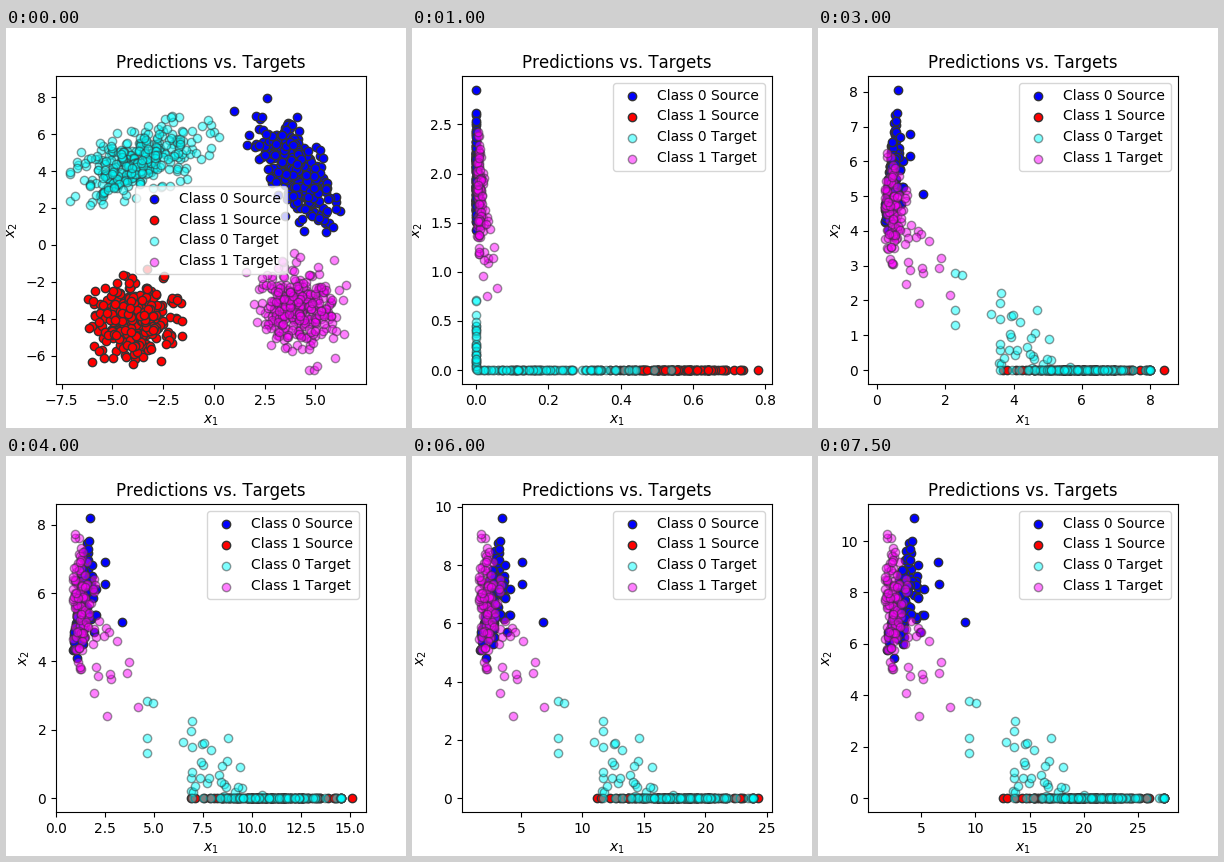
Recreate the animation shown at these times as a matplotlib script. Size 400 by 400 pixels, loop 8 s.

```python
import numpy as np
import matplotlib.pyplot as plt
from matplotlib.animation import FuncAnimation

plt.rcParams["text.kerning_factor"] = 6
rng = np.random.default_rng(7)
N = 120

SERIES = [("Class 0 Source", "blue", 1.0), ("Class 1 Source", "red", 1.0),
          ("Class 0 Target", "cyan", 0.5), ("Class 1 Target", "magenta", 0.5)]

# Snapshots play in file-name order, so epoch 5 comes after 45.
EPOCHS = sorted(range(0, 71, 5), key=str)

# Growth of the feature range during training
KEYS = [0, 5, 10, 15, 30, 40, 50, 55, 70]
X_MIN = [0, 0, 0, .02, .15, .72, 1.1, 1.35, 1.4]
X_MAX = [.45, .0396, .78, 1.8, 8.4, 15.12, 22, 24.27, 27.4]
Y_MAX = [.95, 2.19, 2.85, 3.93, 8.05, 8.2, 10.1, 9.62, 10.9]

X_IN, Y_IN = (-7.09, 6.8), (-6.76, 8.38)


def relu(a):
    return np.maximum(a, 0)


def unit(a):
    return (a - a.min()) / np.ptp(a)


def blob(cx, cy, sx, sy, corr, n=330):
    a, b = rng.normal(size=(2, n))
    x = cx + sx * a
    y = cy + sy * (corr * a + np.sqrt(1 - corr ** 2) * b)
    return np.clip(x, *X_IN), np.clip(y, *Y_IN)


INPUTS = [blob(4.1, 4.1, .95, 1.4, -.62), blob(-4, -4, .95, .95, 0),
          blob(-3.8, 4.5, 1.35, .95, .5), blob(4.1, -3.4, .9, 1.05, 0)]

# Per-sample latents, shared by all epochs
blue_v = .5 + .5 * unit(rng.normal(size=N))
blue_tail = .012 * rng.lognormal(0, .9, N)
red_q = unit(rng.normal(size=N))
cyan_u = np.clip(rng.normal(.64, .16, N + 30), .26, .95)
cyan_d = 1.3 * (.52 - cyan_u) + rng.normal(0, .11, N + 30)
mag_u = np.minimum(.04 * rng.lognormal(0, .75, N), .25)
mag_v = .68 + rng.normal(0, .11, N) - 1.6 * (mag_u - .05)


def features(epoch):
    """Clouds as fractions of the data range; training lifts them off the axes."""
    def key(epochs, values):
        return np.interp(epoch, epochs, values)

    late = key([10, 30], [0, 1])
    drift = key([30, 70], [0, 1])

    blue = (late * (1 + drift) * (.1 * (blue_v - .5) + blue_tail), blue_v)
    base = key([5, 10], [0, .43])
    red = (base + (1 - base) * red_q ** key([0, 5, 10], [2, 4, 1]), 0 * red_q)
    early = (1 - late) * key([0, 5, 10], [.6, 0, 1])
    cyan = (early * relu(-cyan_d) + late * (cyan_u + .05 * drift),
            relu(cyan_d) * key([5, 10, 30], [.5, .65, .9]))
    magenta = (mag_u * key([5, 10, 30], [0, .3, 1]),
               mag_v * key([5, 10, 30, 40], [.7, .9, .82, 1]))
    return blue, red, cyan, magenta


def padded(lo, hi):
    pad = .05 * (hi - lo)
    return lo - pad, hi + pad


fig, ax = plt.subplots(figsize=(4, 4), dpi=100)


def draw(i):
    ax.clear()
    if i == 0:
        clouds, loc = INPUTS, "center"
        xlim, ylim = padded(*X_IN), padded(*Y_IN)
    else:
        epoch = EPOCHS[i - 1]
        x0, x1, y1 = (np.interp(epoch, KEYS, c) for c in (X_MIN, X_MAX, Y_MAX))
        clouds = [(x0 + (x1 - x0) * u, y1 * v) for u, v in features(epoch)]
        loc = "upper right"
        xlim, ylim = padded(x0, x1), padded(0, y1)
    for (x, y), (label, color, alpha) in zip(clouds, SERIES):
        ax.scatter(x, y, s=36, c=color, alpha=alpha, label=label,
                   edgecolors="#333333", linewidths=1)
    ax.set(xlim=xlim, ylim=ylim, xlabel="$x_1$", ylabel="$x_2$",
           title="Predictions vs. Targets")
    ax.legend(loc=loc)
    return []


anim = FuncAnimation(fig, draw, frames=len(EPOCHS) + 1, init_func=lambda: [],
                     interval=500, repeat=True, repeat_delay=0)
plt.show()
```
